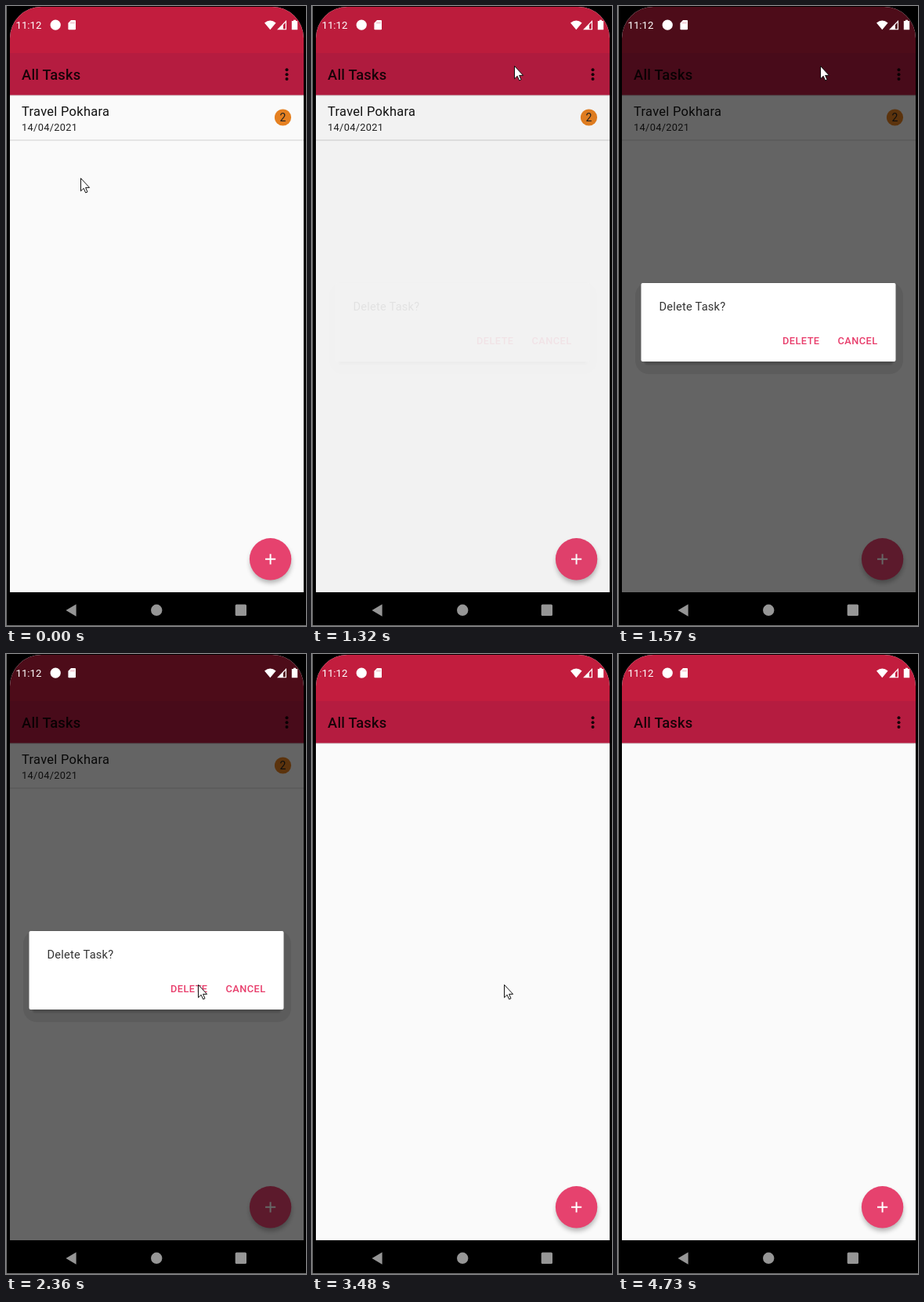
An HTML page for the animation above (5260 ms loop, 383x790 px).

```html
<!DOCTYPE html>
<html lang="en">
<head>
<meta charset="utf-8">
<title>All Tasks</title>
<style>
  html, body { margin: 0; width: 100%; height: 100%; overflow: hidden; background: #000; }
  svg { display: block; width: 383px; height: 790px; font-family: Roboto, sans-serif; }

  .row, .item, .dim, .dialog, .cursor { animation: 5260ms step-end infinite; }
  .row { animation-name: row; }
  .item { animation-name: swipe; }
  .dim { animation-name: dim; }
  .dialog { animation-name: dialog; }
  .cursor { animation-name: cursor; }

  .title { font-size: 18.25px; font-weight: 500; letter-spacing: .23px; }
  .task { font-size: 16.4px; letter-spacing: .32px; }
  .date { font-size: 12.77px; letter-spacing: .34px; }
  .prompt { font-size: 14.6px; letter-spacing: .23px; }
  .action { font-size: 12.77px; font-weight: 500; letter-spacing: .46px; fill: #e83e6c; }

  @keyframes row {
    0% { visibility: visible; }
    63.87%, 100% { visibility: hidden; }
  }
  @keyframes swipe {
    0% { transform: none; }
    17.68% { transform: translateX(94px); }
    19.96% { transform: translateX(245px); }
    22.24% { transform: translateX(380px); }
    25.09%, 100% { transform: none; }
  }
  @keyframes dim {
    0% { opacity: 0; }
    25.09% { opacity: .03; }
    27.56% { opacity: .07; }
    29.84% { opacity: .6; }
    63.87% { opacity: .2; }
    66.15%, 100% { opacity: 0; }
  }
  @keyframes dialog {
    0% { opacity: 0; }
    25.09% { opacity: .08; }
    27.56% { opacity: .36; }
    29.84% { opacity: 1; }
    63.87% { opacity: .02; }
    66.15%, 100% { opacity: 0; }
  }
  @keyframes cursor {
    0% { transform: translate(95px, 219px); }
    2.28% { transform: translate(92px, 210px); }
    4.94% { transform: translate(81px, 186px); }
    7.22% { transform: translate(66px, 156px); }
    9.5% { transform: translate(59px, 141px); }
    17.68% { transform: translate(237px, 137px); }
    19.96% { transform: translate(252px, 100px); }
    22.24% { transform: translate(258px, 76px); }
    34.6% { transform: translate(0, -99px); }
    37.45% { transform: translate(267px, 405px); }
    39.73% { transform: translate(258px, 413px); }
    42.01% { transform: translate(250px, 419px); }
    44.86% { transform: translate(245px, 421px); }
    79.27% { transform: translate(307px, 772px); }
    81.93% { transform: translate(190px, 725px); }
    84.22% { transform: translate(110px, 661px); }
    87.26% { transform: translate(119px, 646px); }
    89.92%, 100% { transform: translate(0, -99px); }
  }
</style>
</head>
<body>
<svg width="383" height="790" viewBox="0 0 383 790">
  <defs>
    <clipPath id="screen"><path d="M5 747V41A40 40 0 0 1 45 1H340A40 40 0 0 1 380 41V747Z"/></clipPath>
    <filter id="soft" x="-30%" y="-30%" width="160%" height="160%"><feGaussianBlur stdDeviation="3"/></filter>
    <filter id="edge"><feGaussianBlur stdDeviation="1.2"/></filter>
  </defs>

  <rect width="383" height="790" fill="#000"/>
  <path d="M.5 0V790M0 789.5H383" stroke="#777"/>

  <g clip-path="url(#screen)">
    <rect x="5" y="1" width="375" height="746" fill="#fafafa"/>

    <g class="row">
      <path d="M5 171H380" stroke="#dedede" stroke-width="1.4"/>
      <g class="item">
        <text class="task" x="20" y="139.5" fill="#111">Travel Pokhara</text>
        <text class="date" x="20" y="159" fill="#222">14/04/2021</text>
        <circle cx="353.5" cy="142" r="10.6" fill="#e58021"/>
        <text x="353.5" y="147" font-size="14" text-anchor="middle" fill="#222">2</text>
      </g>
    </g>

    <rect x="5" y="113" width="375" height="1.5" fill="#000" opacity=".15"/>
    <rect x="5" y="1" width="375" height="60" fill="#c21d3e"/>
    <rect x="5" y="60" width="375" height="53.5" fill="#b51c40"/>
    <text class="title" x="20" y="94" fill="#180308">All Tasks</text>
    <g fill="#180308">
      <circle cx="358.5" cy="81.3" r="2"/>
      <circle cx="358.5" cy="87.2" r="2"/>
      <circle cx="358.5" cy="93" r="2"/>
    </g>

    <circle cx="338" cy="709" r="26" opacity=".3" filter="url(#soft)"/>
    <circle cx="337.6" cy="704.8" r="26.7" fill="#e6426e"/>
    <path d="M331 704.8H344.2M337.6 698.2V711.4" stroke="#fff" stroke-width="2"/>

    <rect class="dim" x="5" y="1" width="375" height="746"/>

    <g class="dialog">
      <rect x="22" y="352" width="342" height="117" rx="17" opacity=".08"/>
      <rect x="34" y="362" width="317" height="95" rx="3" opacity=".18" filter="url(#edge)"/>
      <rect x="29.5" y="353" width="325" height="100" rx="2" fill="#fff"/>
      <text class="prompt" x="52.5" y="387.5" fill="#333">Delete Task?</text>
      <text class="action" x="210" y="431">DELETE</text>
      <text class="action" x="280.5" y="431">CANCEL</text>
    </g>
  </g>

  <g fill="#fff">
    <text x="12.5" y="29.3" font-size="13.2">11:12</text>
    <circle cx="63.2" cy="24.2" r="6.6"/>
    <path d="M83 18H88Q89 18 89 19V29.3Q89 30.3 88 30.3H80.4Q79.4 30.3 79.4 29.3V21.8Z"/>
    <path d="M330 21.5Q337.3 15.5 344.6 21.5L337.3 30.3Z"/>
    <path d="M358 18V30.3H346ZM356.8 21L354 24V29.2H356.8Z" fill-rule="evenodd"/>
    <path d="M367 17.8H370V19H372.2V30.3H364.8V19H367Z"/>
  </g>
  <path d="M83 20.2V22.6M85 20.2V22.6M87 20.2V22.6" stroke="#c21d3e" stroke-width=".8" opacity=".5"/>

  <g fill="#969696">
    <path d="M76.5 770L89.6 762.3V777.7Z"/>
    <circle cx="192.2" cy="769.8" r="7.2"/>
    <rect x="292.7" y="762.5" width="14.3" height="14.4" rx="1.5"/>
  </g>

  <path class="cursor" d="M.5 .5V16.8L4.2 13.3L6.6 18.9L9 17.9L6.6 12.4H11.6Z" fill="#fff" stroke="#111" stroke-width="1"/>
</svg>
</body>
</html>
```
